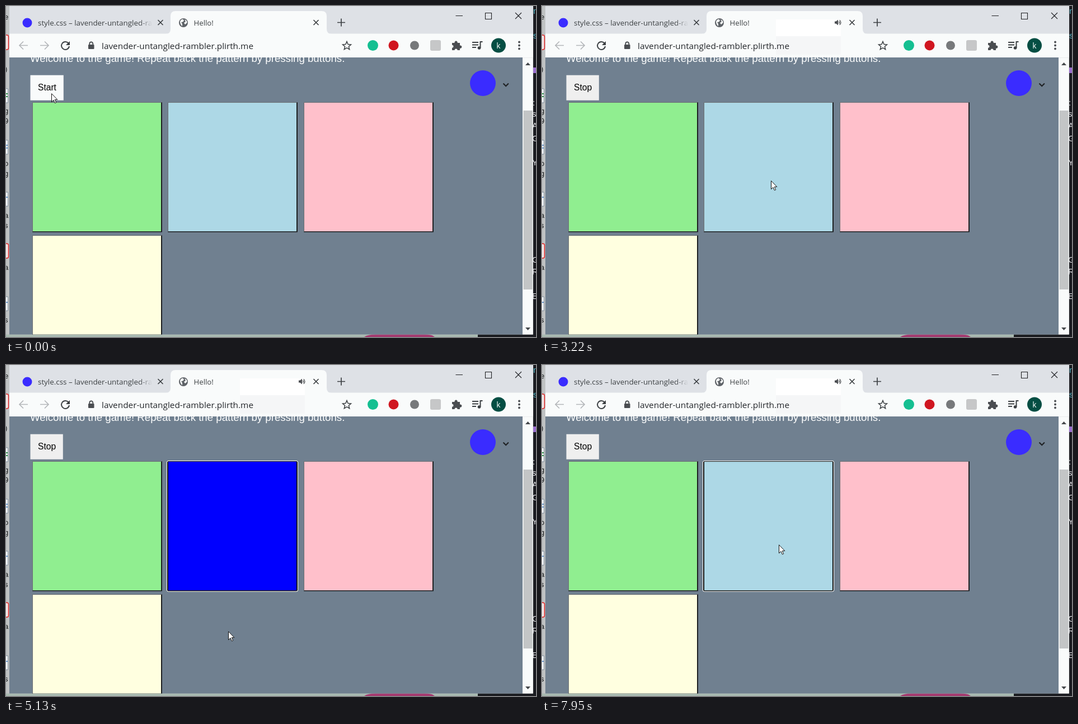
An HTML page that plays this animation: 947 by 592 pixels, repeating every 8000 ms.

```html
<!DOCTYPE html>
<html lang="en">
<head>
<meta charset="utf-8">
<title>Pattern game</title>
<style>
html, body { margin: 0; width: 100%; height: 100%; overflow: hidden; }
svg { display: block; width: 100vw; height: 100vh; }
.ui { font-family: "Open Sans", "Noto Sans", sans-serif; fill: #3c4043; }
.page { font-family: "Liberation Sans", Arial, sans-serif; }
.line { fill: none; stroke: #3c4043; stroke-width: 1.7; }
</style>
</head>
<body>
<svg viewBox="0 0 947 592" preserveAspectRatio="none">
  <defs>
    <linearGradient id="fade">
      <stop offset="0" stop-color="#dee1e6" stop-opacity="0"/>
      <stop offset="1" stop-color="#dee1e6"/>
    </linearGradient>
    <clipPath id="view"><rect x="6" y="92" width="917" height="495.5"/></clipPath>
    <path id="cross" class="line" d="M-4.5-4.5l9 9m0-9l-9 9"/>
    <g id="tile">
      <rect width="232" height="232.5" fill="#1d2022"/>
      <path d="M0 232V0H232L230 1H1V231z" fill="#6c7073"/>
      <rect x="1" y="1" width="229" height="230"/>
    </g>
    <path id="doc" d="M-2 0H3.5V25H-2z" fill="#f4f7fa" stroke="#7d8a98"/>
    <rect id="badge" x="-8" width="12.5" height="26" rx="3" fill="#f3e9e9" stroke="#e02a2a" stroke-width="1.6"/>
  </defs>

  <!-- desktop behind the window -->
  <rect width="947" height="592" fill="#bfc2c3"/>
  <use href="#badge" y="52"/><use href="#badge" y="425"/>
  <use href="#doc" y="148"/><use href="#doc" y="240"/><use href="#doc" y="333"/><use href="#doc" y="520"/>
  <path d="M0 157h3M0 162h3" stroke="#3a9a50" stroke-width="2"/>
  <path d="M0 249h3M0 254h3M0 342h3M0 530h3" stroke="#4a82c4" stroke-width="1.5"/>
  <g class="page" font-size="13" fill="#17191a">
    <text x="-3" y="24">e</text><text x="-2" y="117">)</text><text x="-3" y="192">g</text>
    <text x="-3" y="210">9</text><text x="-3" y="286">o</text><text x="-3" y="304">g</text>
    <text x="-3" y="379">a</text><text x="-3" y="397">s</text><text x="-3" y="472">a</text>
    <text x="-3" y="490">i</text><text x="-3" y="566">s</text>
  </g>
  <rect x="942" width="5" height="592" fill="#1b1c21"/>
  <rect x="942" y="110" width="5" height="10" fill="#9b70cf"/>
  <g class="page" font-size="15" fill="#e8e8ec">
    <text x="942" y="14" fill="#53b7c9">n</text><text x="942" y="58" fill="#53b7c9">s</text>
    <text x="941" y="178">:</text><text x="940" y="198">s</text><text x="940" y="219">A</text>
    <text x="940" y="242">G</text><text x="940" y="285">Y</text><text x="940" y="459">G</text>
    <text x="940" y="480">R</text><text x="940" y="524">E</text>
  </g>
  <rect y="587.5" width="843" height="4.5" fill="#a9bab1"/>
  <path d="M640 592q6-4.5 20-4.5h88q14 0 18 4.5z" fill="#a43a70"/>
  <rect x="843" y="587.5" width="104" height="4.5" fill="#1b1c21"/>

  <!-- tab strip -->
  <rect x="6" width="936" height="50" fill="#dee1e6"/>
  <path d="M285 50q9 0 9-9V18q0-9 9-9H564q9 0 9 9V41q0 9 9 9z" fill="#f9fbfb"/>
  <circle cx="38" cy="30" r="8.5" fill="#3a2cff"/>
  <text class="ui" x="57" y="34.5" font-size="13.4">style.css – lavender-untangled-ra</text>
  <rect x="238" y="18" width="23" height="24" fill="url(#fade)"/>
  <rect x="261" y="18" width="8" height="24" fill="#dee1e6"/>
  <use href="#cross" x="276" y="29.5"/>
  <g transform="translate(317 30)">
    <circle r="8" fill="#5f6368"/>
    <path d="M-6-2Q-5-6-1-6.5L1-4-1-1.5l-3 .5 2 3 0 4Q-6 3-6-2zM2-6q5 2 4.5 6L3 3 1 0l3-2z" fill="#f9fbfb"/>
  </g>
  <text class="ui" x="335.5" y="34.5" font-size="13.2">Hello!</text>
  <path class="line" stroke-width="2" d="M592 29.5h14m-7-7v14"/>
  <g class="line" style="stroke:#202124;stroke-width:1.1">
    <path d="M803.5 17.5h12.5M856.5 12.5h11v11h-11zM910 12l11 11m0-11l-11 11"/>
  </g>

  <!-- toolbar -->
  <rect x="6" y="49.5" width="936" height="43" fill="#f9fbfb"/>
  <g id="patch">
    <rect x="418" y="24" width="116" height="30" fill="#fff"/>
    <rect x="418" y="54" width="116" height="33" fill="#f5f6f7"/>
  </g>
  <g id="speaker" transform="translate(523 29.5)">
    <path d="M0-2h2.5L6-5V5L2.5 2H0z" fill="#4a4d51"/>
    <path class="line" style="stroke-width:1.2" d="M7.5-2.2q1.8 2.2 0 4.4M8.8-4.4q4 4.4 0 8.8"/>
  </g>
  <use href="#cross" x="554" y="29.5"/>
  <path class="line" style="stroke:#b4b7ba" d="M39 70.5H24m7-7l-7 7 7 7M61 70.5h15m-7-7l7 7-7 7"/>
  <path class="line" style="stroke-width:2" d="M111.5 66.5A7 7 0 1 0 113 72"/>
  <path d="M114 63v7h-7z" fill="#3c4043"/>
  <rect x="147" y="69" width="10.5" height="8" rx="1" fill="#4a4d51"/>
  <path class="line" d="M149.3 69v-1.6a3 3 0 0 1 6 0V69"/>
  <text class="ui" x="171" y="76.5" font-size="15.35" style="fill:#24272b">lavender-untangled-rambler.plirth.me</text>
  <path class="line" style="stroke-width:1.5" d="M609 63.5l2.1 5 5.4.5-4.1 3.5 1.3 5.2-4.7-2.8-4.7 2.8 1.3-5.2-4.1-3.5 5.4-.5z"/>
  <circle cx="655.5" cy="70.5" r="9.5" fill="#15bf91"/>
  <circle cx="692.5" cy="70.5" r="9" fill="#d01620"/>
  <circle cx="730" cy="70.5" r="8" fill="#77797b"/>
  <rect x="758" y="61" width="19" height="19" rx="3" fill="#c6c7c8"/>
  <path d="M797 66h4.5a2.7 2.7 0 1 1 5.2 0h4.3v4.5a2.7 2.7 0 1 1 0 5.2V79h-4.4a2.5 2.5 0 0 0-5 0H797v-4.3a2.5 2.5 0 0 0 0-5z" fill="#4a4d51"/>
  <path class="line" style="stroke-width:2" d="M833 65h11M833 69.5h11M833 74h7M847.5 75V64h4"/>
  <circle cx="845.5" cy="75" r="2.8" fill="#3c4043"/>
  <circle cx="880" cy="70.5" r="13" fill="#044e43"/>
  <text class="ui" x="880" y="75.5" font-size="14" text-anchor="middle" style="fill:#fff">k</text>
  <g fill="#4a4d51"><circle cx="917" cy="64.5" r="1.9"/><circle cx="917" cy="70.5" r="1.9"/><circle cx="917" cy="76.5" r="1.9"/></g>

  <!-- page -->
  <g clip-path="url(#view)">
    <rect x="6" y="92" width="917" height="496" fill="#708090"/>
    <text class="page" x="43" y="100" font-size="18.65" fill="#fff">Welcome to the game! Repeat back the pattern by pressing buttons.</text>
    <rect id="button" x="43.5" y="123.7" height="45"/>
    <text id="label" class="page" x="57" y="151" font-size="15.6"></text>
    <use href="#tile" x="47" y="172" fill="#90ee90"/>
    <use href="#tile" x="532" y="172" fill="#ffc0cb"/>
    <use href="#tile" x="47" y="410" fill="#ffffe0"/>
    <use href="#tile" x="289" y="172"/>
    <g id="ring">
      <rect x="287" y="171" width="235" height="234.5" rx="3.5" fill="#fff"/>
      <rect x="288" y="172" width="233" height="232.5" rx="2.5" fill="#101010"/>
    </g>
    <rect id="blue" x="290" y="173" width="229" height="230"/>
    <circle cx="852" cy="138" r="23" fill="#3a2cff"/>
    <path class="line" style="stroke:#1f2225;stroke-width:2.2" d="M888.5 138.5l4.7 4.7 4.7-4.7"/>
  </g>

  <!-- scrollbar -->
  <rect x="923" y="92.5" width="18.5" height="495" fill="#f9fbfb"/>
  <rect x="924.5" y="187" width="16" height="320" fill="#c3c5c6"/>
  <path d="M928 106h9l-4.5-5zM928 575h9l-4.5 5z" fill="#45484b"/>

  <path id="cursor" d="M.5.7V15.6L4 12.3 6.4 17.7 8.7 16.7 6.3 11.4H10.8z" fill="#fff" stroke="#111" stroke-width="1"/>
</svg>
<script>
const LOOP = 8000;
const part = id => document.getElementById(id);

// [time, x, y]
const cursorSteps = [
  [0, 81, 156], [440, 100, 182], [610, 165, 290], [730, 221, 386], [870, 243, 429],
  [1020, 243, 435], [1170, 241, 443], [1330, 270, 470], [1480, 340, 469], [1600, 419, 467],
  [2400, 416, 463], [2530, 409, 449], [2670, 406, 432], [2800, 402, 402], [2920, 400, 375],
  [3070, 409, 325], [3220, 409, 312], [4290, 406, 365], [4410, 400, 440], [4530, 397, 476],
  [7530, 398, 468], [7650, 400, 451], [7810, 411, 367], [7950, 423, 321]
];
const litSpans = [[1020, 2140], [3840, 4140], [5130, 6030], [6430, 7380]];
// [time, label, fill, width]
const buttonSteps = [
  [0, "Start", "#f9fbfb", 59.3],
  [140, "Stop", "#e5e5e5", 58.3],
  [440, "Stop", "#efefef", 58.3]
];

const stepAt = (steps, t) => steps.findLast(step => step[0] <= t);
const show = (id, on) => part(id).setAttribute("visibility", on ? "visible" : "hidden");

function draw(t) {
  const [, x, y] = stepAt(cursorSteps, t);
  part("cursor").setAttribute("transform", `translate(${x} ${y})`);

  const [, label, fill, width] = stepAt(buttonSteps, t);
  part("label").textContent = label;
  part("button").setAttribute("fill", fill);
  part("button").setAttribute("width", width);

  const lit = litSpans.some(([from, to]) => t >= from && t < to);
  part("blue").setAttribute("fill", lit ? "#0000ff" : "#add8e6");
  show("speaker", t >= 2260);
  show("patch", t >= 2400);
  show("ring", t >= 3840);
}

const start = performance.now();
function tick() {
  draw((performance.now() - start) % LOOP);
  requestAnimationFrame(tick);
}
tick();
</script>
</body>
</html>
```
